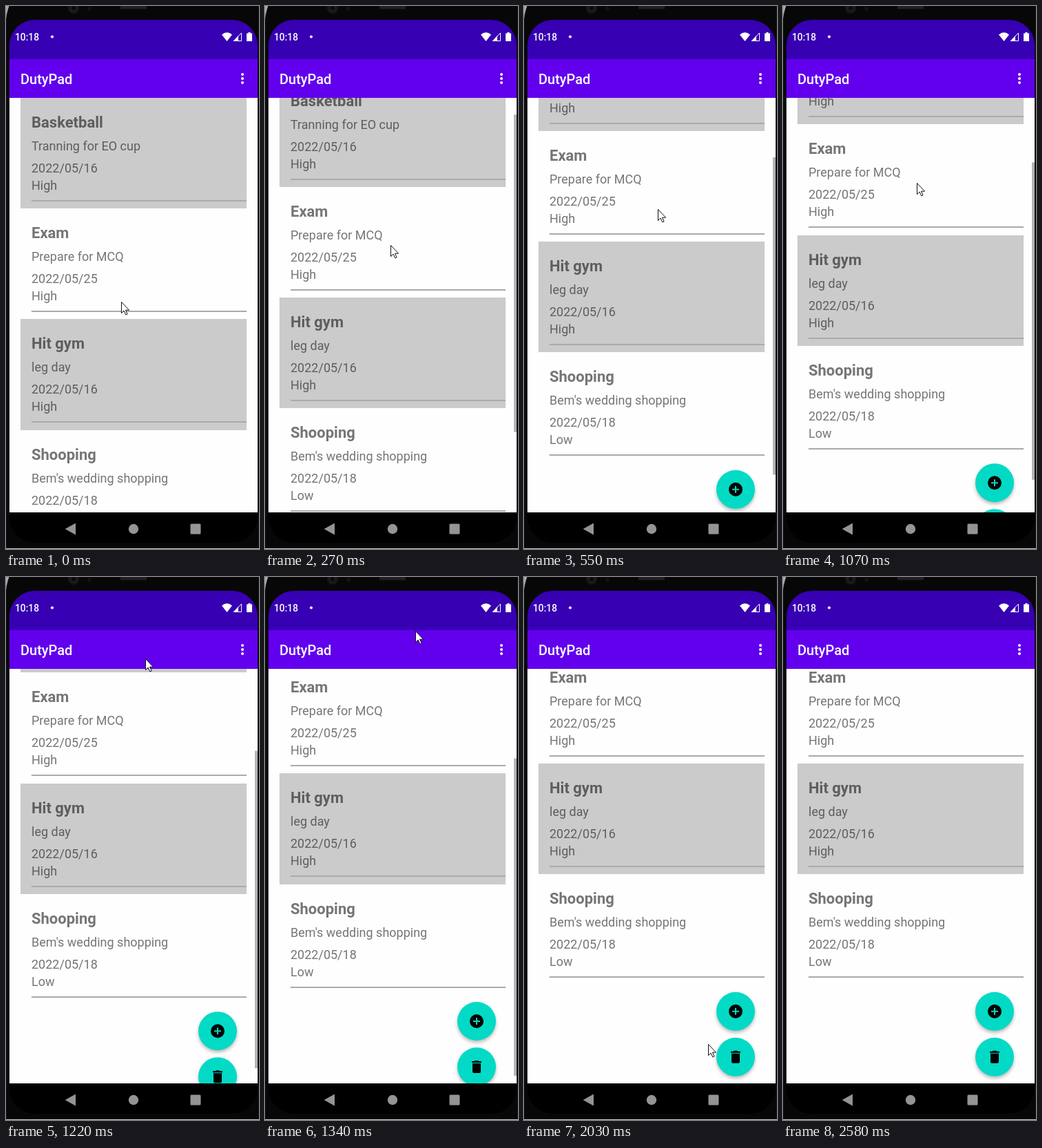
Recreate the animation shown at these times as an HTML page. Size 367x786 px, loop 3090 ms.

```html
<!DOCTYPE html>
<html lang="en">
<head>
<meta charset="utf-8">
<title>Todo list scroll</title>
<style>
  html, body { margin: 0; width: 100%; height: 100%; overflow: hidden; background: #060607; }
  svg { display: block; width: 367px; height: 786px; }
  text { font-family: Roboto, "Open Sans", sans-serif; font-size: 18px; }
  .item text { fill: #000; fill-opacity: .54; }
  .item rect { shape-rendering: crispEdges; }
  .item .title { font-size: 22px; font-weight: 700; }
  .bar { fill: #fff; font-weight: 500; }
  .fab { filter: drop-shadow(0 3px 2.5px rgba(0, 0, 0, .27)); }
</style>
</head>
<body>
<svg viewBox="0 0 367 786">
  <defs>
    <clipPath id="screen"><rect x="5" y="20" width="360" height="757" rx="37"/></clipPath>
    <clipPath id="view"><rect x="5" y="133" width="360" height="600"/></clipPath>
  </defs>

  <!-- Phone body -->
  <rect width="367" height="786" fill="#070708"/>
  <path d="M.5 0V786M366.5 0V786" stroke="#17171a"/>
  <path d="M0 0H4.5Q1.5 8 0 19Z" fill="#a8a8a8"/>
  <rect y="785" width="367" height="1" fill="#d6d6d6"/>
  <circle cx="98" cy="3" r="8" fill="#17171a"/>
  <circle cx="98" cy="3" r="4" fill="#0a0a0c" stroke="#26262a"/>
  <circle cx="121" cy="4" r="3" fill="#121214"/>
  <path d="M166 2H204" stroke="#202022" stroke-width="5"/>

  <g clip-path="url(#screen)">
    <rect x="5" y="20" width="360" height="57" fill="#3700b3"/>
    <rect x="5" y="77" width="360" height="56" fill="#6200ee"/>
    <rect x="5" y="133" width="360" height="600" fill="#fefefe"/>

    <g clip-path="url(#view)">
      <g id="list"></g>
      <path id="glow" fill="#6200ee" fill-opacity=".08"/>
      <rect id="thumb" x="361" width="4" height="459.5" fill="#000" fill-opacity=".3"/>
    </g>

    <!-- Status bar -->
    <text class="bar" x="13" y="50" style="font-size:13.8px">10:18</text>
    <circle cx="67" cy="44.5" r="2" fill="#fff"/>
    <path d="M320.5 51L313 41.5Q320.5 35 328 41.5Z" fill="#fff"/>
    <path d="M341.5 39V50.5H330.5Z" fill="none" stroke="#fff"/>
    <path d="M337 43V51H329.5Z" fill="#fff"/>
    <path d="M349 39.5h2.5V38h3v1.5H357V51H349Z" fill="#fff"/>

    <!-- App bar -->
    <text class="bar" x="21" y="112.5" style="font-size:20px">DutyPad</text>
    <g fill="#fff">
      <circle cx="343" cy="99" r="2"/>
      <circle cx="343" cy="105" r="2"/>
      <circle cx="343" cy="111" r="2"/>
    </g>

    <!-- Navigation bar -->
    <rect x="5" y="733" width="360" height="44"/>
    <g fill="#949494">
      <path d="M85.7 757L101 748.5V765.5Z"/>
      <circle cx="185" cy="757" r="7.2"/>
      <rect x="267.5" y="749.5" width="15" height="15" rx="1.5"/>
    </g>
  </g>

  <path id="cursor" d="M.5.5V16.6L4.1 13.1 6.8 18.9 9.1 17.9 6.5 12.2H11.6Z"
        fill="#fff" stroke="#111"/>
</svg>

<script>
const LOOP = 3090, STEP = 135.8, LEAD = 20;
const TOP = 133, PITCH = 160.2, VIEW = 600, CONTENT = 783;

const tasks = [
  ["Basketball", "Tranning for EO cup", "2022/05/16", "High"],
  ["Exam", "Prepare for MCQ", "2022/05/25", "High"],
  ["Hit gym", "leg day", "2022/05/16", "High"],
  ["Shooping", "Bem's wedding shopping", "2022/05/18", "Low"]
];

// Key points of the two drags and of the way out
const keys = [
  { step: 1, x: 167, y: 428, scroll: 0 },
  { step: 2, x: 182, y: 346, scroll: 31.5 },
  { step: 4, x: 194, y: 294, scroll: 112.2 },
  { step: 6, x: 194, y: 267, scroll: 121.8 },
  { step: 8, x: 194, y: 256, scroll: 121.8 },
  { step: 9, x: 202, y: 118, scroll: 154.8 },
  { step: 11, x: 233, y: 38, scroll: 183.2 },
  { step: 12, x: 233, y: 38, scroll: 183.2 },
  { step: 15, x: 267, y: 676, scroll: 183.2 },
  { step: 18, x: 329, y: 778, scroll: 183.2 },
  { step: 19, x: 400, y: 800, scroll: 183.2 }
];

const el = id => document.getElementById(id);
const list = el("list"), glow = el("glow"), thumb = el("thumb"), cursor = el("cursor");
const clamp = v => Math.min(1, Math.max(0, v));

const line = (text, y, cls = "") => `<text class="${cls}" x="37" y="${y}">${text}</text>`;

const item = ([title, note, date, level], i) => `
  <g class="item" transform="translate(0 ${TOP + i * PITCH})">
    ${i % 2 ? "" : `<rect x="21" width="328" height="${PITCH}" fill="#cbcbcb"/>`}
    ${line(title, 43, "title")}${line(note, 76)}${line(date, 108)}${line(level, 133)}
    <rect x="37" y="148" width="312" height="2" fill="#aaa"/>
  </g>`;

const fab = (y, icon) => `
  <g transform="translate(307 ${y})">
    <circle class="fab" r="28" fill="#03dac5"/>
    <path transform="translate(-12 -12)" fill-rule="evenodd" d="${icon}"/>
  </g>`;

list.innerHTML = tasks.map(item).join("")
  + fab(812, "M12 2a10 10 0 1 0 0 20 10 10 0 0 0 0-20ZM17 13h-4v4h-2v-4H7v-2h4V7h2v4h4Z")
  + fab(878, "M6 19a2 2 0 0 0 2 2h8a2 2 0 0 0 2-2V7H6ZM19 4h-3.5l-1-1h-5l-1 1H5v2h14Z");

function pose(step) {
  const next = Math.max(1, keys.findIndex(k => k.step >= step));
  const a = keys[next - 1], b = keys[next];
  const p = clamp((step - a.step) / (b.step - a.step));
  const mix = name => a[name] + (b[name] - a[name]) * p;
  return { x: mix("x"), y: mix("y"), scroll: mix("scroll") };
}

function glowPath(h) {
  const base = 591, edge = base - h * .28, peak = base - h;
  return h ? `M5 ${base}V${edge}Q185 ${2 * peak - edge} 365 ${edge}V${base}Z` : "";
}

function draw(time) {
  // The picture moves on in even, hard steps
  const step = Math.min(19, Math.floor((time % LOOP + LEAD) / STEP));
  const { x, y, scroll } = pose(step);
  list.setAttribute("transform", `translate(0 ${-scroll})`);
  thumb.setAttribute("y", TOP + scroll * VIEW / CONTENT);
  thumb.setAttribute("opacity", step < 2 ? 0 : clamp((15 - step) / 2));
  glow.setAttribute("d", glowPath(step < 12 ? 0 : 23 * clamp((14 - step) / 2)));
  cursor.setAttribute("transform", `translate(${Math.round(x)} ${Math.round(y)})`);
}

const start = performance.now();
function tick() {
  draw(performance.now() - start);
  requestAnimationFrame(tick);
}
tick();
</script>
</body>
</html>
```
